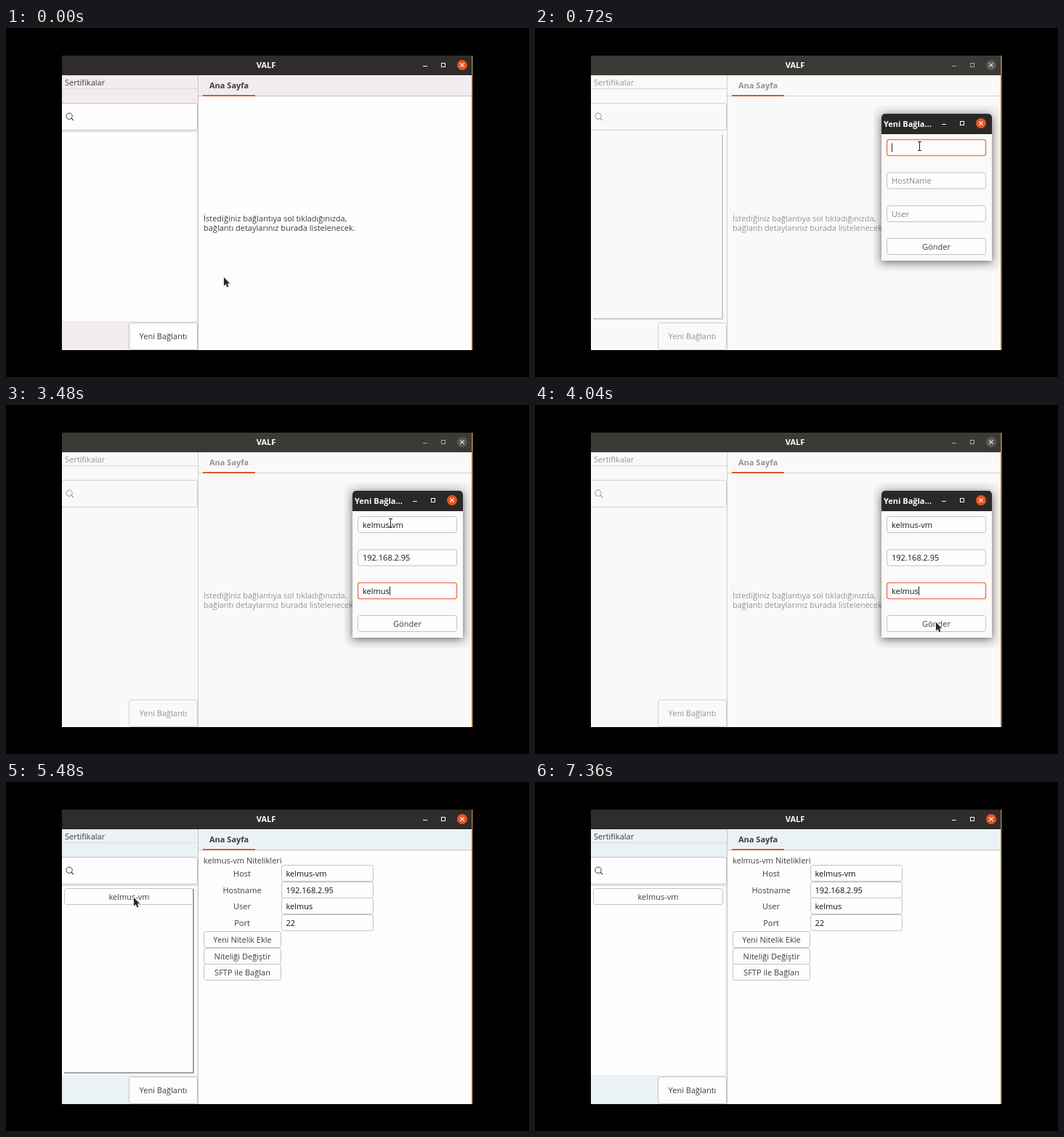
An HTML page with a canvas for the animation above (7480 ms loop, 720x480 px).

```html
<!DOCTYPE html>
<html lang="tr">
<head>
<meta charset="utf-8">
<title>VALF</title>
<style>
  html, body { margin: 0; width: 100%; height: 100%; overflow: hidden; background: #000; }
  canvas { display: block; }
</style>
</head>
<body>
<canvas id="stage" width="720" height="480"></canvas>
<script>
const ctx = document.getElementById('stage').getContext('2d');
const LOOP = 7480, STEP = 40;
const USER = 'kelmus', HOST = USER + '-vm', ADDRESS = '192.168.2.95';

const ACTIVE = { bar: '#2f2c2b', page: '#fdfdfd', text: '#3e3e3e', line: '#c6c2c0', rule: '#dedade',
                 icon: '#fff', cross: '#fff', close: '#e95420', scroll: '#a2a2a2' };
const BACKDROP = { bar: '#3c3a37', page: '#f9f9f9', text: '#949494', line: '#cfcfcf', rule: '#d6d6d6',
                   icon: '#aaa8a6', cross: '#e4e4e4', close: '#5a5856', scroll: '#cdcdcd', tint: '#f9f9f9' };
const PINK = '#f2ecf1', BLUE = '#eaf2f5';

const OPEN = 400, SENT = 4040, ROW = 4160, DETAILS = 5400;

// Pointer path: time, x, y
const PATH = [
  [0, 300, 343], [300, 216, 422], [400, 216, 422], [700, 529, 162], [3680, 529, 162],
  [3920, 552, 299], [4080, 552, 299], [4480, 440, 262], [5040, 209, 199], [5280, 172, 158],
  [5440, 172, 158], [6040, 525, 266], [6360, 440, 285], [6680, 470, 290], [7300, 646, 446]
];

// Typing: time at which each character lands
const every = (start, gap, n) => Array.from({ length: n }, (_, i) => start + gap * i);
const FIELDS = [
  { y: 153, hint: 'Host', text: HOST, keys: every(800, 60, 9), focus: 0 },
  { y: 198.5, hint: 'HostName', text: ADDRESS, focus: 1440,
    keys: [...every(1560, 60, 7), 2080, 2320, 2400, 2560, 2640] },
  { y: 244, hint: 'User', text: USER, keys: [3320, ...every(3320, 40, 5)], focus: 2800 }
];

const clamp = v => Math.max(0, Math.min(1, v));
const ramp = (t, a, b) => clamp((t - a) / (b - a));

function rect(x, y, w, h, color) {
  ctx.fillStyle = color;
  ctx.fillRect(x, y, w, h);
}

function box(x, y, w, h, fill, stroke, width = 1) {
  ctx.beginPath();
  ctx.roundRect(x + .5, y + .5, w - 1, h - 1, 3);
  ctx.fillStyle = fill;
  ctx.fill();
  ctx.strokeStyle = stroke;
  ctx.lineWidth = width;
  ctx.stroke();
}

function label(text, x, y, color, align = 'left', weight = 400) {
  ctx.font = `${weight} 11px "Open Sans", "Noto Sans", sans-serif`;
  ctx.textAlign = align;
  ctx.fillStyle = color;
  ctx.fillText(text, x, y + 4);
}

function strokePath(color, width, ...lines) {
  ctx.strokeStyle = color;
  ctx.lineWidth = width;
  ctx.beginPath();
  for (const [x1, y1, x2, y2] of lines) {
    ctx.moveTo(x1, y1);
    ctx.lineTo(x2, y2);
  }
  ctx.stroke();
}

function faded(alpha, draw) {
  if (alpha <= 0) return;
  ctx.save();
  ctx.globalAlpha *= alpha;
  draw();
  ctx.restore();
}

// Minimise, maximise and close; x and y are the centre of the close button
function controls(x, y, c) {
  rect(x - 54, y + 1, 6, 1, c.icon);
  ctx.strokeStyle = c.icon;
  ctx.lineWidth = 1;
  ctx.strokeRect(x - 28.5, y - 2.5, 5, 5);
  ctx.fillStyle = c.close;
  ctx.beginPath();
  ctx.arc(x, y, 7, 0, 7);
  ctx.fill();
  strokePath(c.cross, 1.2, [x - 2.7, y - 2.7, x + 2.7, y + 2.7], [x - 2.7, y + 2.7, x + 2.7, y - 2.7]);
}

function button(text, x, y, w, h, c) {
  box(x, y, w, h, c.page, c.line);
  label(text, x + w / 2, y + h / 2, c.text, 'center');
}

function details(c) {
  label(HOST + ' Nitelikleri', 272, 108, c.text);
  const rows = [['Host', HOST], ['Hostname', ADDRESS], ['User', USER], ['Port', '22']];
  rows.forEach(([name, value], i) => {
    const y = Math.round(114 + i * 22.7);
    label(name, 325, y + 11.5, c.text, 'center');
    box(379, y, 127, 23, c.page, c.line);
    label(value, 385.5, y + 11.5, '#111');
  });
  ['Yeni Nitelik Ekle', 'Niteliği Değiştir', 'SFTP ile Bağlan'].forEach((text, i) =>
    button(text, 272, Math.round(205 + i * 22.7), 107, 23, c));
}

function scrollShade(t) {
  if (t < OPEN + 1000) return ramp(t, 80, 300) * (1 - ramp(t, 800, 1200));
  return ramp(t, 4640, 4840) * (1 - ramp(t, 6320, 6680));
}

function mainWindow(t, c) {
  const tint = c.tint || (t < SENT ? PINK : BLUE);
  rect(77, 38, 565, 28, c.bar);
  label('VALF', 358, 51, '#fff', 'center', 700);
  controls(628, 51, c);

  rect(77, 65, 565, 378, c.page);
  rect(77, 65, 187, 378, tint);
  rect(265, 66, 376, 27, tint);
  label('Sertifikalar', 81, 75, c.text);
  rect(77, 83, 187, 1, c.rule);
  box(70, 103, 194, 38, c.page, c.line);
  ctx.strokeStyle = c.text;
  ctx.lineWidth = 1;
  ctx.beginPath();
  ctx.arc(87, 121.2, 4.2, 0, 7);
  ctx.stroke();
  strokePath(c.text, 1.2, [90, 124.2, 92.8, 127]);

  rect(77, 143, 185, 260, c.page);
  rect(77, 142, 187, 1, c.tint ? c.page : c.rule);
  if (t >= ROW) button(HOST, 80, 146, 179, 23, c);
  faded(scrollShade(t), () => {
    rect(257, 147, 2, 254, c.scroll);
    rect(80, 399, 179, 2, c.scroll);
  });
  button('Yeni Bağlantı', 169, 405, 95, 38, c);
  rect(264, 65, 1, 378, c.line);

  label('Ana Sayfa', 280, 79, c.text, 'left', 700);
  rect(265, 93, 376, 1, c.line);
  rect(271, 92, 72, 2, '#e2562c');
  if (t >= DETAILS) details(c);
  else {
    label('İstediğiniz bağlantıya sol tıkladığınızda,', 272, 261.5, c.text);
    label('bağlantı detaylarınız burada listelenecek.', 272, 274.5, c.text);
  }
  rect(641, 38, 1.5, 405, '#a87c48');
}

function dialogShape() {
  ctx.beginPath();
  ctx.roundRect(477, 118, 152, 202, [5, 5, 0, 0]);
}

function dialog(t) {
  ctx.save();
  ctx.beginPath();
  ctx.rect(77, 38, 566, 405);
  ctx.clip();
  ctx.beginPath();
  ctx.roundRect(466, 107, 176, 227, 14);
  ctx.fillStyle = 'rgba(0,0,0,.03)';
  ctx.fill();
  dialogShape();
  ctx.shadowColor = 'rgba(0,0,0,.6)';
  ctx.shadowBlur = 12;
  ctx.shadowOffsetY = 2;
  ctx.fillStyle = '#fafafa';
  ctx.fill();
  ctx.restore();

  ctx.save();
  dialogShape();
  ctx.clip();
  rect(477, 118, 152, 28, '#2b2928');
  ctx.restore();
  label('Yeni Bağla…', 480, 131.5, '#fff', 'left', 700);
  controls(614, 131, ACTIVE);

  const focused = FIELDS.findLast(f => t >= f.focus);
  for (const f of FIELDS) {
    const on = f === focused, mid = f.y + 11.5;
    const typed = f.text.slice(0, f.keys.filter(k => k <= t).length);
    box(484, f.y, 137, 23, '#fdfdfd', on ? '#ea8261' : '#c6c2c0', on ? 1.6 : 1);
    if (typed || on) label(typed, 491, mid, '#181818');
    else label(f.hint, 491, mid, '#8a8a8a');
    if (on) rect(Math.round(491 + ctx.measureText(typed).width), mid - 6, 1, 12, '#222');
  }
  button('Gönder', 484, 289, 137, 23, ACTIVE);
}

function pointerAt(t) {
  const i = PATH.findIndex(p => p[0] > t);
  if (i < 0) return null;
  const [t0, x0, y0] = PATH[i - 1], [t1, x1, y1] = PATH[i];
  const k = (t - t0) / (t1 - t0), e = k * k * (3 - 2 * k);
  return [x0 + (x1 - x0) * e, y0 + (y1 - y0) * e];
}

function pointer(t, open) {
  const p = pointerAt(t);
  if (!p) return;
  const [x, y] = p;
  const overField = open && x > 484 && x < 621 && FIELDS.some(f => y > f.y && y < f.y + 23);
  ctx.save();
  ctx.beginPath();
  ctx.rect(77, 38, 565, 405);
  ctx.clip();
  ctx.translate(Math.round(x), Math.round(y));
  if (overField) {
    strokePath('#222', 1, [.5, -5, .5, 6], [-2, -5.5, 3, -5.5], [-2, 6.5, 3, 6.5]);
  } else {
    ctx.beginPath();
    [[0, 0], [0, 11.5], [2.7, 9.2], [4.6, 13.4], [6.4, 12.6], [4.6, 8.5], [8, 8.2]]
      .forEach(q => ctx.lineTo(...q));
    ctx.closePath();
    ctx.strokeStyle = '#e4e4e4';
    ctx.lineWidth = 1.6;
    ctx.stroke();
    ctx.fillStyle = '#2a2a2a';
    ctx.fill();
  }
  ctx.restore();
}

function draw(t) {
  rect(0, 0, 720, 480, '#000');
  ctx.save();
  ctx.beginPath();
  ctx.rect(77, 38, 566, 405);
  ctx.clip();
  mainWindow(t, ACTIVE);
  faded(ramp(t, OPEN, OPEN + 200) * (1 - ramp(t, SENT, SENT + 200)), () => mainWindow(t, BACKDROP));
  ctx.restore();
  const shown = ramp(t, OPEN, OPEN + 120) * (1 - ramp(t, SENT, SENT + 120));
  faded(shown, () => dialog(t));
  pointer(t, shown > 0);
}

const start = performance.now();
function frame() {
  const t = (performance.now() - start) % LOOP;
  draw(Math.floor(t / STEP) * STEP);
  requestAnimationFrame(frame);
}
frame();
</script>
</body>
</html>
```
